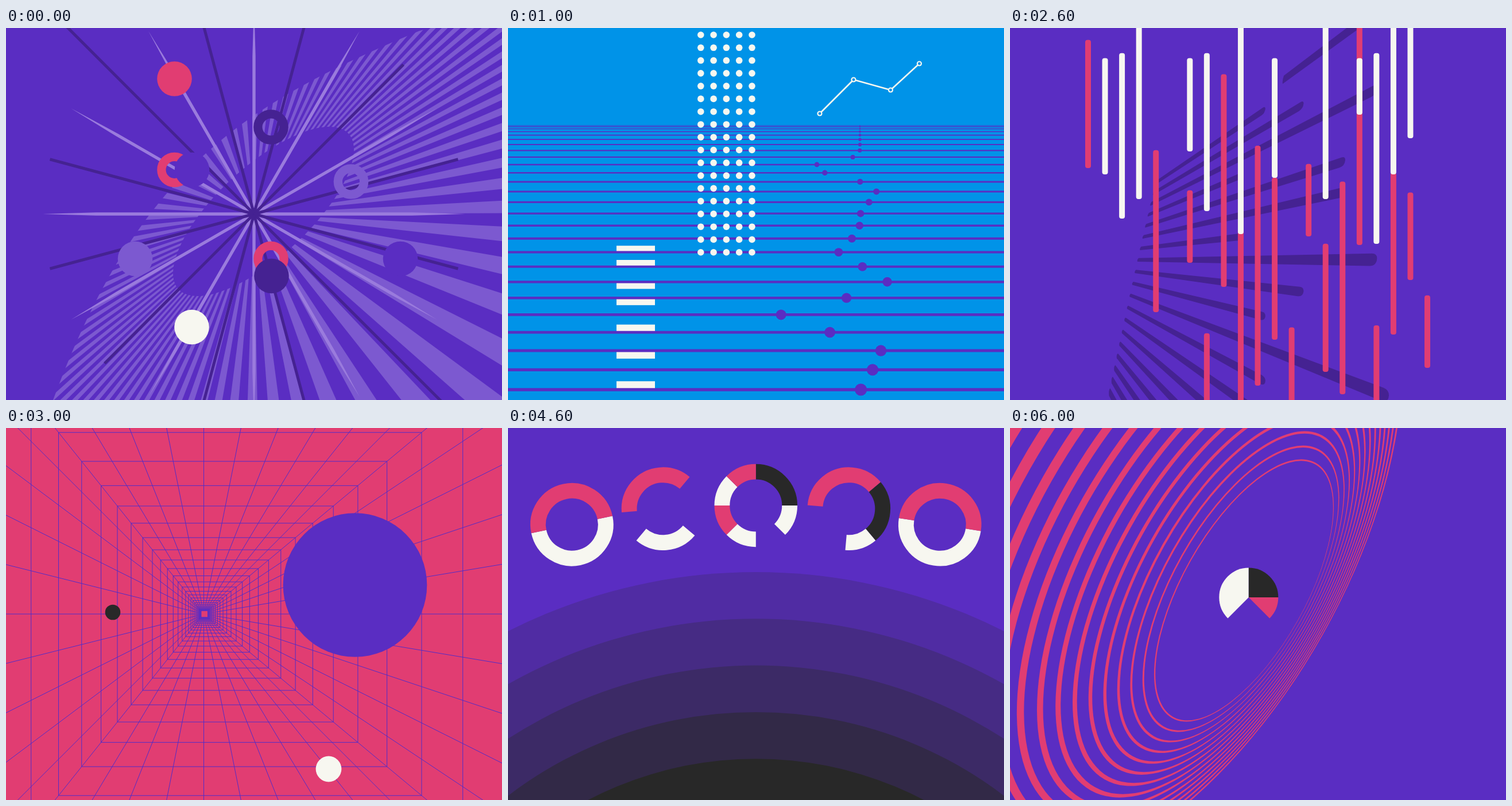
These frames come from a looping animation (864x648 px, 7 s). An HTML page with a canvas:

```html
<!DOCTYPE html>
<html lang="en">
<head>
<meta charset="utf-8">
<title>Geometric scenes</title>
<style>
html, body { margin: 0; overflow: hidden; background: #5a2dc2; }
canvas { display: block; }
</style>
</head>
<body>
<canvas id="stage" width="864" height="648"></canvas>
<script>
const W = 864, H = 648, TAU = Math.PI * 2;
const PURPLE = '#5a2dc2', PINK = '#e13d72', BLUE = '#0093e8', WHITE = '#f7f7f0',
  BLACK = '#282828', DARK = '#452292', LIGHT = '#7c59d0', PALE = '#9a7bdd';
const g = document.getElementById('stage').getContext('2d');

function background(color) {
  g.fillStyle = color;
  g.fillRect(0, 0, W, H);
}

function disc(x, y, r, color) {
  g.fillStyle = color;
  g.beginPath();
  g.arc(x, y, r, 0, TAU);
  g.fill();
}

// Ring segment between two radii, angles in degrees clockwise from the right
function ring(x, y, outer, inner, color, from = 0, to = 360) {
  g.strokeStyle = color;
  g.lineWidth = outer - inner;
  g.beginPath();
  g.arc(x, y, (outer + inner) / 2, from * TAU / 360, to * TAU / 360);
  g.stroke();
}

function polygon(points, color) {
  g.fillStyle = color;
  g.beginPath();
  points.forEach(p => g.lineTo(...p));
  g.fill();
}

function line(x1, y1, x2, y2, width, color) {
  g.strokeStyle = color;
  g.lineWidth = width;
  g.beginPath();
  g.moveTo(x1, y1);
  g.lineTo(x2, y2);
  g.stroke();
}

// Adds a unit circle seen through an affine map
function mappedCircle(...map) {
  g.save();
  g.transform(...map);
  g.moveTo(1, 0);
  g.arc(0, 0, 1, 0, TAU);
  g.restore();
}

function randomFrom(seed) {
  return () => (seed = seed * 16807 % 2147483647) / 2147483647;
}

function burst() {
  background(PURPLE);
  g.save();
  g.beginPath();
  g.moveTo(82, 648);
  g.bezierCurveTo(230, 247, 415, 132, 720, 5);
  g.lineTo(740, 0);
  g.lineTo(W, 0);
  g.lineTo(W, H);
  g.clip();
  // Equal angles on a disc tilted about the rising diagonal
  const count = 84, squash = 0.42;
  const rim = i => {
    const a = i / count * TAU, u = Math.cos(a) * 2000, v = Math.sin(a) * 2000 * squash;
    return [432 + u + v, 324 - u + v];
  };
  for (let i = 0; i < count; i++) {
    polygon([[432, 324], rim(i + 0.15), rim(i + 0.65)], LIGHT);
  }
  g.restore();
  g.fillStyle = PURPLE;
  g.beginPath();
  mappedCircle(157.5, -107.7, 0, -100.8, 448.5, 319.5);
  g.fill();

  const spokes = draw => {
    for (let i = 0; i < 12; i++) {
      g.save();
      g.translate(432, 324);
      g.rotate(i * TAU / 12);
      draw(i);
      g.restore();
    }
  };
  spokes(() => polygon([[0, -2.7], [275, -2.7], [368, 0], [275, 2.7], [0, 2.7]], PALE));
  spokes(i => {
    g.rotate(TAU / 24);
    line(0, 0, i % 6 === 1 ? 540 : 368, 0, 5, DARK);
  });

  ring(461.5, 172.5, 30.3, 15, DARK);
  ring(293.5, 247, 30.3, 15, PINK);
  ring(601, 267.5, 30.3, 15, LIGHT);
  ring(461.5, 402, 30.3, 15, PINK);
  disc(293.5, 88.5, 30.3, PINK);
  disc(324, 247, 30.3, PURPLE);
  disc(225, 402, 30.3, LIGHT);
  disc(462.5, 432, 30.3, DARK);
  disc(687, 402, 30.3, PURPLE);
  disc(323.5, 521, 30.3, WHITE);
}

function horizon() {
  background(BLUE);
  const lineY = i => 170 + 1.44 * i + 0.6785 * i * i;
  // Blocks stand on (negative) or hang from (positive) the numbered line
  g.fillStyle = WHITE;
  [-17, -18, 19, 20, -22, 23, -25].forEach(n => {
    const i = Math.abs(n);
    g.fillRect(189, lineY(i), 67, Math.sign(n) * (4 + 0.43 * i));
  });
  const swings = [[9.4, -88], [12.2, 30], [17, -38], [19, 50], [21.1, -140], [23.2, 42]];
  for (let i = 0; i < 26; i++) {
    const x = swings.reduce((sum, [at, size]) => sum + size * Math.exp(-((i - at) ** 2)), 613);
    line(0, lineY(i), W, lineY(i), 0.9 + 0.18 * i, PURPLE);
    disc(x, lineY(i), 0.8 + 0.39 * i, PURPLE);
  }
  for (let col = 0; col < 5; col++) {
    for (let row = 0; row < 18; row++) disc(335.8 + col * 22.3, 12 + row * 22.28, 5.8, WHITE);
  }
  const chart = [[543, 149], [602, 90], [666.5, 108], [716.5, 62]];
  chart.slice(1).forEach((p, i) => line(...chart[i], ...p, 2.6, WHITE));
  chart.forEach(([x, y]) => {
    disc(x, y, 4.6, WHITE);
    disc(x, y, 2.4, BLUE);
  });
}

// Beam pointing away from (53, 404), between two distances in x
function beam(slope, x1, x2) {
  const angle = Math.atan(slope), rate = 0.037 + (angle < 0 ? 0.027 : -0.006) * angle;
  const spread = rate / 2 * (1 + slope * slope), h1 = x1 * spread, h2 = x2 * spread;
  g.save();
  g.transform(1, slope, 0, 1, 53, 404);
  g.fillStyle = DARK;
  g.beginPath();
  g.moveTo(x1 + 2, -h1);
  g.lineTo(x2 - h2 * 0.8, -h2);
  g.quadraticCurveTo(x2, -h2, x2, -h2 * 0.2);
  g.quadraticCurveTo(x2 - 1, h2, x2 - h2 * 1.2, h2);
  g.lineTo(x1, h1);
  g.quadraticCurveTo(x1 - 1, 0, x1 + 2, -h1);
  g.fill();
  g.restore();
}

function bars() {
  background(PURPLE);
  for (let k = 0; k < 20; k++) {
    const reach = 477 + 130 * Math.cos(k * TAU / 2.75);
    beam(1.087 * Math.exp(0.065 * k) - 1.829, k ? 205 - 4.5 * k : 422, reach);
  }
  const column = (col, top, bottom, color) => {
    if (!bottom) return;
    g.fillStyle = color;
    g.beginPath();
    g.roundRect(131 + col * 29.55, top, 10, bottom - top, 4);
    g.fill();
  };
  // Lower end of the bar in each column; the lengths follow a wave
  const pink = [244, 0, 0, 0, 495, 0, 409, 755, 451, 700, 623, 543, 674, 363, 599, 638, 378, 936, 534, 439, 592];
  const white = [0, 255, 332, 298, 0, 0, 215, 319, 0, 359, 0, 261, 0, 0, 298, 0, 151, 376, 255, 192];
  pink.forEach((end, i) => column(i, end - 290 - 170 * Math.cos((i - 9.2) * TAU / 7), end, PINK));
  white.forEach((end, i) => column(i, 60 * Math.cos((i - 1.4) * TAU / 5), end, WHITE));
}

function tunnel() {
  background(PINK);
  const color = '#512cc8', near = 600, far = 5.5;
  // Place on the square of half size s, with u and v from -1 to 1
  const at = (s, u, v) => [344.5 + s * (0.2 + u), 324 + s * v];
  g.strokeStyle = color;
  g.lineWidth = 1;
  for (let s = 376; s > far; s *= 0.841) g.strokeRect(...at(s, -1, -1), 2 * s, 2 * s);
  const spoke = (u, v) => line(...at(far, u, v), ...at(near, u, v), 1, color);
  for (let i = -5; i < 5; i++) {
    const k = i / 5;
    spoke(k, -1);
    spoke(1, k);
    spoke(-k, 1);
    spoke(-1, -k);
  }
  disc(608, 273.5, 125.3, PURPLE);
  disc(186, 321, 13.3, BLACK);
  disc(562, 594, 22.4, WHITE);
}

function donuts() {
  background(PURPLE);
  for (let k = 1; k <= 5; k++) {
    const mix = (a, b) => Math.round(a + (b - a) * k / 5);
    disc(432, 1208, 957 - 81.3 * (k - 1), `rgb(${mix(90, 40)},${mix(45, 40)},${mix(194, 40)})`);
  }
  const donut = (x, y, ...parts) =>
    parts.forEach(([color, from, to]) => ring(x, y, 72.3, 45.5, color, from, to));
  donut(111.3, 168.2, [WHITE, -12, 168], [PINK, 168, 348]);
  donut(270, 140.7, [PINK, 175, 310], [WHITE, 40, 130]);
  donut(431.8, 135, [BLACK, 270, 360], [WHITE, 0, 45], [WHITE, 90, 135], [PINK, 135, 180],
    [WHITE, 180, 225], [PINK, 225, 270]);
  donut(593.8, 140.7, [PINK, 185, 320], [BLACK, 320, 410], [WHITE, 50, 95]);
  donut(752.3, 168.2, [WHITE, 9, 189], [PINK, 189, 369]);
}

function stripes() {
  background(PURPLE);
  for (let y = -W; y < H; y += 11.3) line(-5, y - 5, W, y + W, 3.3, BLUE);
  const random = randomFrom(7);
  // Gap along the diagonal that meets the top edge at offset
  const gap = (offset, x) => {
    const end = x + 70 + 60 * random();
    line(x, x - offset, end, end - offset, 8 + 7 * random(), PURPLE);
  };
  for (let offset = -190; offset < 200; offset += 70) gap(offset, Math.max(offset, 0) - 5);
  for (let offset = 284; offset < 770; offset += 68) gap(offset, 620 + 180 * random());

  ring(536, 141.8, 91.3, 60.8, PURPLE, 270, 450);
  ring(536, 141.8, 91.3, 60.8, WHITE, 90, 180);
  ring(536, 141.8, 91.3, 60.8, BLUE, 180, 270);
  disc(613.5, 648, 282, PURPLE);
  ring(613.5, 648, 282, 187.5, BLUE, 270, 360);
}

function orbits() {
  background(PURPLE);
  // Circle on a tilted plane in perspective, rising towards the upper left
  const tilt = 0.3, ax = -85.4, ay = -48.3, bx = 119.5, by = -212;
  const orbit = n => {
    const r = 1 + 0.082 * n, depth = 1 - (tilt * r) ** 2;
    const long = r / depth, wide = r / Math.sqrt(depth), shift = tilt * r * long;
    mappedCircle(ax * long, ay * long, bx * wide, by * wide, 435.6 + ax * shift, 298.9 + ay * shift);
  };
  g.fillStyle = PINK;
  for (let n = 0; n < 14; n++) {
    g.beginPath();
    orbit(n);
    orbit(n - 0.12 - 0.025 * n);
    g.fill('evenodd');
  }
  ring(415.8, 295, 51.5, 0, WHITE, 135, 270);
  ring(415.8, 295, 51.5, 0, BLACK, 270, 360);
  ring(415.8, 295, 51.5, 0, PINK, 0, 45);
}

const scenes = [burst, horizon, bars, tunnel, donuts, stripes, orbits];
const start = performance.now();
let shown = -1;

function tick() {
  const index = Math.floor((performance.now() - start) / 1000) % scenes.length;
  if (index !== shown) scenes[shown = index]();
  requestAnimationFrame(tick);
}
tick();
</script>
</body>
</html>
```
